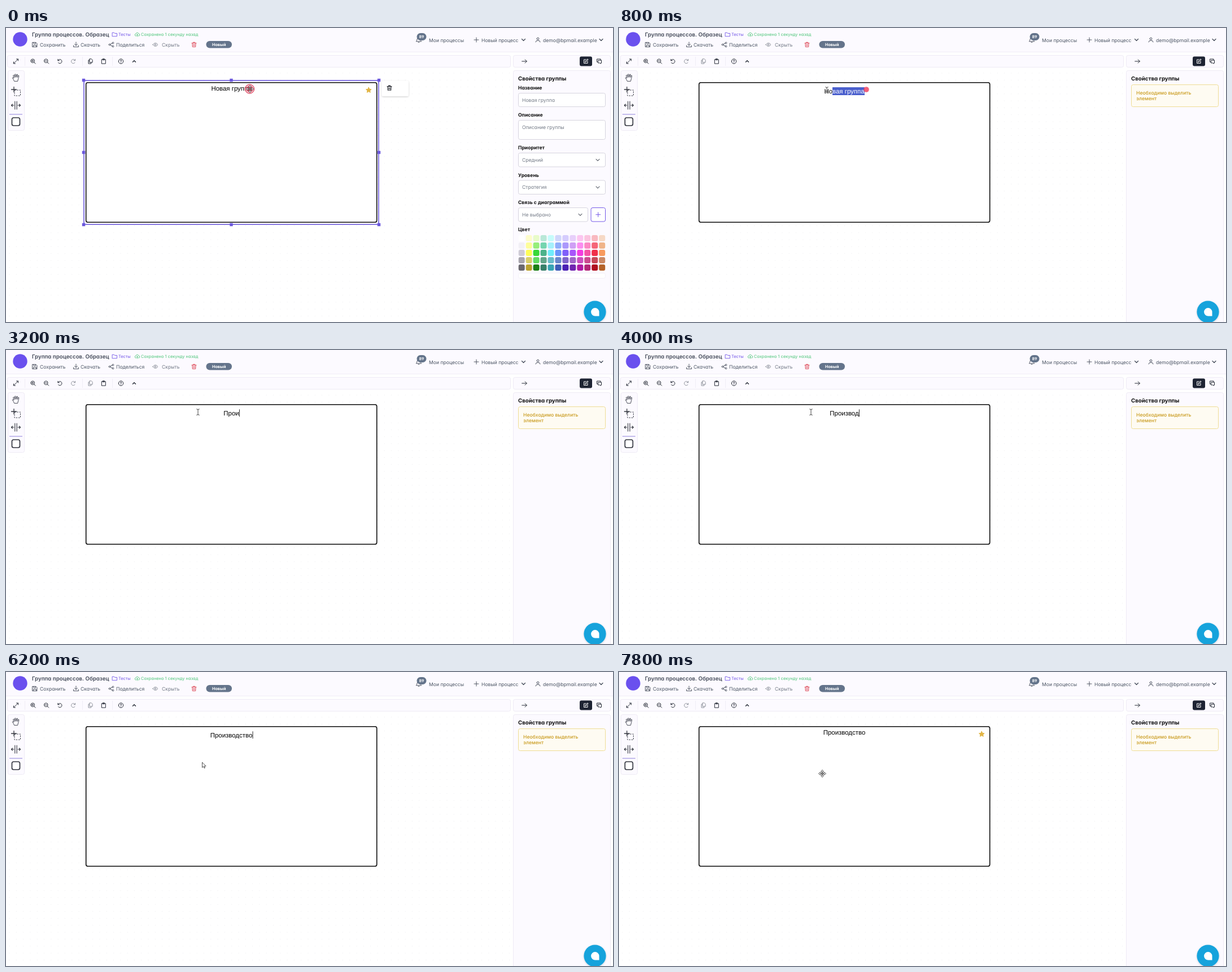
An HTML page for the animation above (8 s loop, 1075 by 521 pixels).

```html
<!DOCTYPE html>
<html lang="ru">
<head>
<meta charset="utf-8">
<title>Редактор группы</title>
<style>
  html, body { margin: 0; width: 100%; height: 100%; overflow: hidden; background: #fff; }
  svg { display: block; width: 1075px; height: 521px; }
  text { font: 8.6px Inter, sans-serif; font-feature-settings: "cv02", "cv03", "cv04", "cv11"; text-rendering: geometricPrecision; fill: #4b5563; white-space: pre; }
  .label { font-weight: 700; fill: #111; }
  .head { font-weight: 700; font-size: 9.7px; fill: #111; }
  .title { font-weight: 600; font-size: 9.7px; fill: #434a58; }
  .small { font-size: 7.45px; }
  .muted { fill: #737a86; }
  .warn { font-weight: 500; fill: #c99a1c; }
  .name { font: 11.45px "Liberation Sans", Arial, sans-serif; fill: #000; text-anchor: middle; }
  .panel { fill: #fcfaff; stroke: #eeeaf5; }
  .field { fill: #fff; stroke: #d6d4de; }
  .icon { fill: none; stroke-linecap: round; stroke-linejoin: round; }
</style>
</head>
<body>
<svg id="stage" viewBox="0 0 1075 521" xmlns="http://www.w3.org/2000/svg"></svg>
<script>
const LOOP = 8000, STEP = 200;
const EDIT_START = 200, TYPE_START = 2400, KEY_GAP = 225, COMMIT = 7400;
const OLD_NAME = 'Новая группа', NEW_NAME = 'Производство';
const CENTER = 399;

const ring = (x, y, r) => `M${x - r} ${y}a${r} ${r} 0 1 0 ${2 * r} 0a${r} ${r} 0 1 0 ${-2 * r} 0`;
const rect = (x, y, w, h, r, attrs) => `<rect x="${x}" y="${y}" width="${w}" height="${h}" rx="${r}" ${attrs}/>`;
const text = (x, y, str, cls = '', attrs = '') => `<text x="${x}" y="${y}" class="${cls}" ${attrs}>${str}</text>`;
const icon = (x, y, d, color = '#3f4654', width = .9, attrs = '') =>
  `<path class="icon" transform="translate(${x} ${y})" d="${d}" stroke="${color}" stroke-width="${width}" ${attrs}/>`;

const shapes = {
  save: 'M-4-4H2L4-2V4H-4ZM-2-4V-1.5H1.5V-4M-2.5 4V1H2.5V4',
  download: 'M0-4.5V1.5M-2.5-1L0 1.5L2.5-1M-4.5 1.5V4H4.5V1.5',
  share: 'M-1.8-.7L1.8-2.5M-1.8.7L1.8 2.5' + ring(-3, 0, 1.4) + ring(3, -3, 1.4) + ring(3, 3, 1.4),
  eye: 'M-4.5 0Q0-6 4.5 0Q0 6-4.5 0Z' + ring(0, 0, 1.3),
  trash: 'M-4-2.7H4M-1.5-2.7V-4.2H1.5V-2.7M-3.1-2.7L-2.7 4H2.7L3.1-2.7M-1-.6V2.2M1-.6V2.2',
  folder: 'M-4-3.3H-1L0-2H4V3.3H-4Z',
  cloud: 'M-2 2.6H-2.6A2 2 0 0 1-2.6-1.3A2.8 2.8 0 0 1 2.6-1.3A2 2 0 0 1 2.6 2.6H2M0 3.5V-.3M-1.4 1L0-.4L1.4 1',
  bell: 'M-4.5 2.6Q-3 1.5-3-1A3 3 0 0 1 3-1Q3 1.5 4.5 2.6ZM-1.2 4.2Q0 5.2 1.2 4.2',
  plus: 'M-4 0H4M0-4V4',
  down: 'M-3-1.5L0 1.5L3-1.5',
  up: 'M-2.5 1.2L0-1.3L2.5 1.2',
  user: ring(0, -2, 1.9) + 'M-4 4Q-4 1 0 1Q4 1 4 4',
  expand: 'M-4 4L4-4M1-4H4V-1M-4 1V4H-1',
  zoom: ring(-.7, -.7, 3.3) + 'M1.8 1.8L4.2 4.2M-2.2-.7H.8',
  undo: 'M-3.6-3.7V-1.2H-1.1M-3.5-1.2A3.6 3.6 0 1 1-3 2.4',
  redo: 'M3.6-3.7V-1.2H1.1M3.5-1.2A3.6 3.6 0 1 0 3 2.4',
  copy: 'M-1.3-4.2H1.8L3.6-2.4V2H-1.3ZM-1.3-2H-3.5V4.2H1.2V2',
  paste: 'M-3.3-3.2H3.3V4.2H-3.3ZM-1.3-4.3H1.3V-2.3H-1.3Z',
  help: ring(0, 0, 4.2) + 'M-1.3-.9Q-1.2-2.2 0-2.2Q1.3-2.2 1.3-1Q1.3-.2 0 .6M0 2.2V2.3',
  arrow: 'M-4.3 0H4.3M1.2-3.1L4.3 0L1.2 3.1',
  edit: 'M0-3H-3.4V3.5H3V0M-1.2 1.3L-.9-.4L3-4.1L4.1-3L.4.9Z',
  chat: 'M-2.5 1.2H-4V-4H2.6V-2.4M-1.5-1.8H4V3H2.8V4.3L1.2 3H-1.5Z',
  hand: 'M-3 6Q-4 3-6.3.4Q-6-1.2-3.5 1L-4.8-4Q-3.6-5.6-2.8-3.8L-1.8-.5L-2-5.8Q-.8-7.3-.2-5.5L.2-.8L1.5-5.7Q2.8-6.7 3-5L2.5-.4L4.3-3.8Q5.8-4.3 5.3-2.4Q4.5 1 3.2 6Z',
  lasso: 'M-3-8V1M-7.5-3.5H1.5',
  space: 'M-1.7-7V7M1.7-7V7M-3.5 0H-8M-6-2L-8 0L-6 2M3.5 0H8M6-2L8 0L6 2',
  star: Array.from({ length: 10 }, (_, i) => {
    const a = i * Math.PI / 5 - Math.PI / 2, r = i % 2 ? 2.4 : 5;
    return (i ? 'L' : 'M') + (r * Math.cos(a)).toFixed(2) + ' ' + (r * Math.sin(a)).toFixed(2);
  }).join('') + 'Z'
};

const header = () => rect(0, 0, 1075, 43, 0, 'fill="#fcfaff"') + rect(0, 42, 1075, 1, 0, 'fill="#f0edf6"') +
  '<circle cx="25" cy="20" r="12.7" fill="#6a50ee"/>' +
  text(46, 15, 'Группа процессов. Образец', 'title') +
  icon(192.5, 11.5, shapes.folder, '#7458e8') + text(199, 14.2, 'Тесты', 'small', 'style="fill:#7458e8"') +
  icon(232.5, 11.5, shapes.cloud, '#4cc578') + text(239, 14.2, 'Сохранено 1 секунду назад', 'small', 'style="fill:#4cc578"') +
  icon(51, 29.5, shapes.save) + text(60, 32.6, 'Сохранить') +
  icon(124, 29.5, shapes.download) + text(132, 32.6, 'Скачать') +
  icon(186.5, 29.5, shapes.share) + text(195, 32.6, 'Поделиться') +
  icon(264.5, 29.5, shapes.eye, '#7b818c') + text(276, 32.6, 'Скрыть', 'muted') +
  icon(333, 29.5, shapes.trash, '#dc4050') +
  rect(354.5, 23, 45.5, 12.5, 6.2, 'fill="#64748b"') +
  text(377.2, 32, 'Новый', '', 'text-anchor="middle" style="fill:#fff;font-size:7.25px;font-weight:700"') +
  icon(731, 21, shapes.bell) + rect(727.5, 9, 17, 13, 6.5, 'fill="#64748b"') +
  text(736, 18, '89', '', 'text-anchor="middle" style="fill:#fff;font-size:7px;font-weight:700"') +
  text(749, 24.6, 'Мои процессы') +
  icon(833, 21, shapes.plus) + text(842, 24.6, 'Новый процесс') + icon(916.5, 21, shapes.down, '#3f4654', 1.2) +
  icon(942, 21, shapes.user) + text(951, 24.6, 'demo@bpmail.example') + icon(1054, 21, shapes.down, '#3f4654', 1.2);

const toolbars = () => {
  const dark = '#252a35';
  return rect(2.5, 48.5, 891, 21, 3, 'class="panel"') + rect(898.5, 48.5, 172, 21, 3, 'class="panel"') +
    [33, 135, 188].map(x => rect(x, 51, 1, 16, 0, 'fill="#f0edf6"')).join('') +
    [[17.5, 'expand'], [48, 'zoom'], [71.5, 'zoom'], [95.5, 'undo'], [173, 'paste'], [203.5, 'help'], [918, 'arrow'], [1050.5, 'chat']]
      .map(([x, key]) => icon(x, 59, shapes[key], dark, 1)).join('') +
    icon(47.3, 58.3, 'M0-1.5V1.5', dark, 1) + icon(119, 59, shapes.redo, '#8f939c', 1) + icon(227, 59, shapes.up, dark, 1.4) +
    icon(149.5, 59, shapes.copy, dark, 1, 'id="copy"') +
    rect(1016, 50.5, 22, 17, 3, 'fill="#1e2433"') + icon(1027, 59, shapes.edit, '#fff', 1) +
    rect(3.5, 75.5, 29, 106, 3, 'class="panel"') +
    icon(17.5, 88, shapes.hand, '#4a4d58', 1) + icon(17, 112.5, shapes.lasso, '#33363f', 1.3) +
    rect(15, 110, 10.5, 10, 0, 'fill="none" stroke="#33363f" stroke-dasharray="2.5 1.8"') +
    icon(17.5, 137, shapes.space, '#33363f', 1.1) + rect(6, 152.5, 23, 1, 0, 'fill="#8f82dc"') +
    rect(10.5, 159, 14, 14, 3, 'fill="#fff" stroke="#33363f" stroke-width="1.7"');
};

const palette = [
  'fff fdfccb e8fbc9 b9e8d8 c6fbfb d0d6fb d5ccfd e8d0fb fcc6f0 fbc4e0 f9b9c0 f6d9c6',
  'f2f0f6 fdfd9b 96ee7b 74d5b0 a5f0fb 90aefa ab98fb cf9ff5 fb8ef0 fb8ac5 f56578 f0b48a',
  'cfccd6 fdfd58 38d838 4cb28a 70ecfb 6a94fa 8060fa a855fa f23ee0 f552a8 f0304a f89a5e',
  'a8a6ae d8cf6a 62dc62 62a68a 68bccb 6a88cc 8065cb a064c8 cc50c0 cc4a90 c84858 cc8864',
  '6a686e bca32e 1c8016 38806a 38a4b4 3c5cb8 4a20b4 7024b0 b01aa4 b42878 b01020 b4622a'
];
const swatches = () => palette.map((row, j) => row.split(' ').map((c, i) =>
  rect(907.7 + i * 12.95, 367 + j * 13, 11, 11, 3, `fill="#${c}"`)).join('')).join('');

const field = (y, h, value, w = 154) => rect(907.5, y, w, h, 3, 'class="field"') + text(914, y + 15.3, value, 'muted');
const select = (y, value, w) => field(y, 24.5, value, w) + icon(907.5 + (w || 154) - 13.5, y + 12.3, shapes.down, '#60656f', 1.1);
const label = (y, str) => text(907, y, str, 'label');

const form = () => label(108.6, 'Название') + field(115.5, 24, OLD_NAME) +
  label(157, 'Описание') + field(163.5, 34, 'Описание группы') +
  label(215.3, 'Приоритет') + select(221.5, 'Средний') +
  label(263.6, 'Уровень') + select(270, 'Стратегия') +
  label(312, 'Связь с диаграммой') + select(318.5, 'Не выбрано', 123) +
  rect(1036, 318.5, 25.5, 24.5, 3, 'fill="#fff" stroke="#7458e8"') + icon(1048.7, 330.7, shapes.plus, '#7458e8', 1) +
  label(360.2, 'Цвет') + swatches() + rect(907.5, 434.5, 154, 9, 3, 'fill="#fff" stroke="#f3f0f8"');

const warning = () => rect(907.5, 100.5, 154, 39, 3, 'fill="#fefbf2" stroke="#efdd94"') +
  text(916, 117.6, 'Необходимо выделить', 'warn') + text(916, 128.4, 'элемент', 'warn');

const selection = () => {
  const xs = [137.5, CENTER, 660.5], ys = [92.5, 220.5, 348.5];
  const handles = xs.flatMap(x => ys.map(y => x === xs[1] && y === ys[1] ? '' : rect(x - 2.7, y - 2.7, 5.4, 5.4, 0, 'fill="#6b58dc"')));
  return rect(138, 93, 522, 255, 0, 'fill="none" stroke="#6b58dc" stroke-width="1.6"') + handles.join('') +
    rect(665.5, 93.5, 47.5, 27.5, 3, 'fill="#fff" filter="url(#shadow)"') + icon(679, 106.3, shapes.trash, '#22252c', 1.1);
};

const quarter = a => `<path transform="rotate(${a})" d="M-.8-1V-3.6H-2.4L0-6.6L2.4-3.6H.8V-1Z"/>`;
const pointers = () =>
  `<g id="move" fill="#fff" stroke="#333" stroke-width=".8">${[0, 90, 180, 270].map(quarter).join('')}<circle r="1.2"/></g>` +
  '<path id="ibeam" class="icon" d="M-2.3-5.3Q0-5.3 0-4Q0-5.3 2.3-5.3M0-4V4M-2.3 5.3Q0 5.3 0 4Q0 5.3 2.3 5.3" stroke="#333" stroke-width=".9"/>' +
  '<path id="arrow" d="M0 0V9.3L2.2 7.3L3.6 10.4L5 9.8L3.7 6.8H6.6Z" fill="#fff" stroke="#222" stroke-width=".8" stroke-linejoin="round"/>';

const stage = document.getElementById('stage');
stage.innerHTML = `<defs>
  <pattern id="dots" width="12.3" height="12.3" patternUnits="userSpaceOnUse"><circle cx="6" cy="6" r=".6" fill="#e9e9ed"/></pattern>
  <filter id="shadow" x="-30%" y="-30%" width="160%" height="160%"><feDropShadow dx="0" dy="1" stdDeviation="1.6" flood-opacity=".2"/></filter>
  <clipPath id="clip"><rect id="clipRect" y="104" height="16" width="200"/></clipPath></defs>` +
  rect(0, 70, 896, 451, 0, 'fill="url(#dots)"') + header() + toolbars() +
  rect(898.5, 75.5, 172, 460, 3, 'class="panel"') + text(907, 93.2, 'Свойства группы', 'head') +
  `<g id="form">${form()}</g><g id="warning">${warning()}</g>` +
  rect(141.7, 96.7, 515, 247.5, 3.2, 'fill="#fff" stroke="#0b0b0b" stroke-width="1.6"') +
  `<g id="selection">${selection()}</g>` +
  icon(642.3, 110.2, shapes.star, '#e2b544', 1, 'id="star" style="fill:#e2b544"') +
  text(CENTER, 110.7, '', 'name', 'id="name"') +
  `<g id="marked" clip-path="url(#clip)">${rect(363, 105, 72, 14, 0, 'fill="#4a5fcd"')}${text(CENTER, 115.7, OLD_NAME, 'name', 'style="fill:#fff"')}</g>` +
  rect(0, 105.2, .9, 12.8, 0, 'id="caret" fill="#111"') +
  `<g id="ripple" fill="#ee4462"><circle id="halo" r="8.2" fill-opacity=".45" stroke="#d8405a" stroke-width="1"/><circle r="4.8" fill-opacity=".85"/></g>` +
  `<g id="pointer">${pointers()}</g>` +
  '<circle cx="1043" cy="503" r="19.6" fill="#17a3dc" filter="url(#shadow)"/>' +
  '<path d="M1050.5 510.5H1043.5A7.2 7.2 0 1 1 1050.5 503.3Z" fill="#fff"/>';

const part = Object.fromEntries([...stage.querySelectorAll('[id]')].map(el => [el.id, el]));
const show = (id, on) => { part[id].style.display = on ? '' : 'none'; };

// time, x, y
const pointerPath = [[0, 432, 108], [200, 434, 108], [400, 438, 109], [600, 418, 109], [800, 368, 110],
  [1000, 345, 110], [1200, 340, 110], [5200, 340, 110], [6200, 347.5, 160], [7000, 360, 180], [LOOP, 360, 180]];
// time, left edge of the marked text
const markPath = [[400, 435], [600, 416], [800, 378], [1000, 363], [LOOP, 363]];

function along(path, t) {
  const i = Math.max(1, path.findIndex(p => p[0] > t));
  const [a, b] = [path[i - 1], path[i]];
  const k = (t - a[0]) / (b[0] - a[0]);
  return a.slice(1).map((v, n) => v + (b[n + 1] - v) * k);
}

function render(now) {
  const t = Math.floor(now % LOOP / STEP) * STEP;
  const editing = t >= EDIT_START && t < COMMIT;
  const typing = t >= TYPE_START;
  const marked = t >= 400 && !typing;
  const typed = Math.min(NEW_NAME.length, Math.floor((t - TYPE_START) / KEY_GAP) + 1);

  show('form', t < EDIT_START);
  show('selection', t < EDIT_START);
  show('warning', t >= EDIT_START);
  show('star', !editing);
  part.copy.setAttribute('stroke', t < EDIT_START ? '#252a35' : '#8f939c');

  part.name.textContent = typing ? NEW_NAME.slice(0, typed) : OLD_NAME;
  part.name.setAttribute('y', editing ? 115.7 : 110.7);
  show('marked', marked);
  if (marked) part.clipRect.setAttribute('x', along(markPath, t)[0]);

  const blinkOn = t < 5000 || (t - 5000) % 1000 < 500;
  show('caret', editing && !marked && blinkOn);
  part.caret.setAttribute('x', CENTER + part.name.getComputedTextLength() / 2 + .3);

  show('ripple', t < 1000);
  show('halo', t < EDIT_START);
  part.ripple.setAttribute('transform', t < 400 ? 'translate(431.5 108)' : 'translate(438 109)');

  const [x, y] = along(pointerPath, t);
  const kind = !editing ? 'move' : y < 130 ? 'ibeam' : 'arrow';
  for (const id of ['move', 'ibeam', 'arrow']) show(id, id === kind);
  part.pointer.setAttribute('transform', `translate(${x} ${y})`);
}

function tick() {
  render(performance.now());
  requestAnimationFrame(tick);
}
tick();
</script>
</body>
</html>
```
